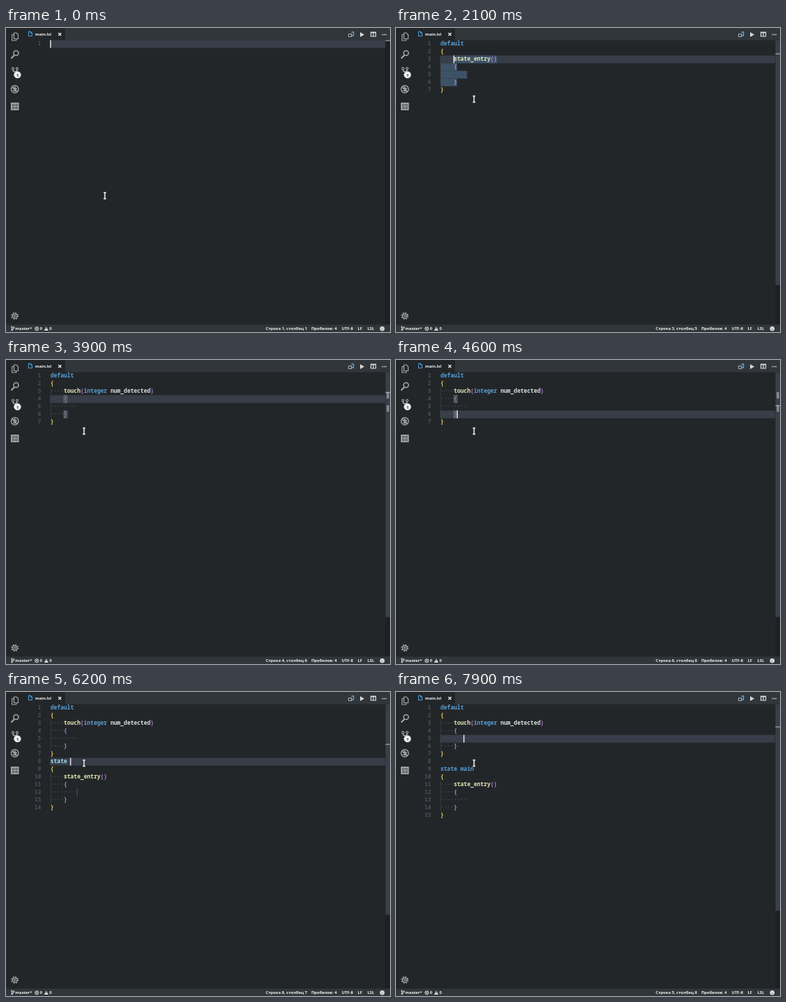
Write an HTML page that moves like this. It is 553 px wide and 436 px high and loops after 8000 ms.

```html
<!DOCTYPE html>
<html lang="ru">
<head>
<meta charset="utf-8">
<title>main.lsl</title>
<style>
html, body { margin: 0; width: 100%; height: 100%; overflow: hidden; background: #232629; }
svg { display: block; width: 553px; height: 436px; }
text { white-space: pre; }
.code text { font: 600 8px "Noto Sans Mono", "DejaVu Sans Mono", monospace; }
.ui { font: 600 5.9px "Noto Sans", "Open Sans", sans-serif; fill: #f3f4f5; }
.icon { fill: none; stroke: #a3a7aa; stroke-width: 1.2; }
</style>
</head>
<body>
<svg viewBox="0 0 553 436" xmlns="http://www.w3.org/2000/svg">
  <rect width="553" height="436" fill="#232629"/>
  <rect x="85" width="468" height="17.500" fill="#31363b"/>
  <g class="code" id="editor"></g>
  <g class="icon">
    <path d="M11.500 7h3.500l2.500 2.500v6h-6zM11 9.500h-2.300v8.500h6v-2"/>
    <circle cx="14.500" cy="36" r="3.500" stroke-width="1.600"/>
    <path d="M12 39l-4.500 4.500" stroke-width="2.200"/>
    <circle cx="10" cy="58" r="1.500"/><circle cx="16" cy="58" r="1.500"/><circle cx="13" cy="67" r="1.500"/>
    <path d="M10 59.500q0 3 3 3.500q3-.5 3-3.500M13 63v3" stroke-width="1.500"/>
    <circle cx="12.700" cy="87.800" r="5.300" stroke-width="1.400"/>
    <path d="M9 84l7.500 7.500M9.500 87h6.500M10 90h5.500M12.800 84v7.500" stroke-width="1.600"/>
    <rect x="7.500" y="107.500" width="10.500" height="10" fill="#a3a7aa" stroke="#a3a7aa" stroke-width="1"/>
    <path d="M9.300 109.300h2.500v2.300h-2.500zM13.800 109.300h2.500v2.300h-2.500zM9.300 113.600h2.500v2.300h-2.500zM13.800 113.600h2.500v2.300h-2.500z" stroke="#3a3e42" stroke-width=".8"/>
    <circle cx="12.700" cy="413" r="3.100"/>
    <circle cx="12.700" cy="413" r="4.500" stroke-dasharray="1.770" stroke-width="1.700"/>
    <circle cx="12.700" cy="413" r=".8"/>
  </g>
  <circle cx="16.600" cy="67.300" r="5" fill="#eceeef"/>
  <text x="16.600" y="69.500" text-anchor="middle" class="ui" style="fill:#31363b">1</text>
  <path d="M32.500 5h3l2 2v4.500h-5zM35.300 5v2.200h2" fill="none" stroke="#4aa3df"/>
  <text x="42" y="11.200" class="ui">main.lsl</text>
  <path d="M75.500 7l4 4m0-4l-4 4" stroke="#eee" stroke-width="1.300"/>
  <g class="icon" stroke-width="1">
    <path d="M497 6h3.500v5h-3M493.500 8.500h4v4h-4z"/>
    <path d="M496 8l3 3M499 5l2 2" stroke="#4aa3df" stroke-width="1.500"/>
    <path d="M525.500 6h7v6h-7zM529 6v6M525.500 6.700h7" stroke="#dfe1e3"/>
  </g>
  <path d="M510 6l6 3.500l-6 3.500z" fill="#d5d8da"/>
  <path d="M541.500 9.500h1.500m1 0h1.500m1 0h1.500" stroke="#d5d8da" stroke-width="1.500"/>
  <rect y="425.500" width="553" height="10.500" fill="#31363b"/>
  <g fill="none" stroke="#eceef0">
    <circle cx="8.500" cy="428.800" r=".8"/><circle cx="8.500" cy="433.200" r=".8"/><circle cx="11.300" cy="429.500" r=".8"/>
    <path d="M8.500 429.500v3q2.500 0 2.800-2.200"/>
    <circle cx="44.300" cy="431.300" r="2.500"/><path d="M43.200 430.200l2.200 2.200m0-2.200l-2.200 2.200"/>
  </g>
  <path d="M58 428.400l3 5.500h-6z" fill="#eceef0"/>
  <path d="M58 430.200v1.700m0 .6v.8" stroke="#31363b" stroke-width=".8"/>
  <circle cx="541.800" cy="431.200" r="3.300" fill="#eceef0"/>
  <path d="M540 431.500q1.800 2.400 3.600 0M540.600 429.400v1m2.400-1v1" fill="none" stroke="#31363b" stroke-width=".7"/>
  <g class="ui">
    <text x="13.300" y="433.400">master*</text><text x="48.800" y="433.400">0</text><text x="62.500" y="433.400">0</text>
    <text id="position" x="433.600" y="433.400" text-anchor="end"></text>
    <text x="476.300" y="433.400" text-anchor="end">Пробелов: 4</text><text x="483.500" y="433.400">UTF-8</text>
    <text x="506.500" y="433.400">LF</text><text x="520.500" y="433.400">LSL</text>
  </g>
  <g class="code" id="popup"></g>
  <g id="mouse">
    <path id="beam" d="M-2-4.500h4M-2 4.500h4M0-4.500v9" stroke="#202225" stroke-width="2.800"/>
    <path id="beamCore" d="M-1.800-4.300h3.600M-1.800 4.300h3.600M0-4.300v8.600" stroke="#e6e7e8" stroke-width="1.700"/>
    <path id="hand" d="M-1.500 1v-4q.8-1.500 1.600 0v3l3.500.6q1 .5.800 2l-.8 4.400h-4.400l-2.700-4q.5-1.500 2-.5z" fill="#222" stroke="#eee" stroke-width=".7"/>
  </g>
</svg>
<script>
const LOOP = 8000, LEFT = 64, TOP = 17.5, CHAR = 4.8, LINE = 11, VIEW = 408;
const COLORS = { keyword: '#569fd6', open: '#9bdcf0', call: '#e3e3b4', plain: '#d9dde1', outer: '#f5cf5c', inner: '#c07be6', dots: '#4b5159' };
const byId = id => document.getElementById(id);
const rect = (x, y, w, h, fill, extra = '') => `<rect x="${x}" y="${y}" width="${w}" height="${h}" fill="${fill}" ${extra}/>`;
const text = (x, y, body, fill = COLORS.plain, extra = '') => `<text x="${x}" y="${y}" fill="${fill}" ${extra}>${body}</text>`;
const span = (body, fill) => `<tspan fill="${fill}">${body}</tspan>`;
const lineTop = line => TOP + (line - 1) * LINE;
const columnX = column => LEFT + (column - 1) * CHAR;

const block = (head, handler) => [head, '{', '    ' + handler, '    {', '        ', '    }', '}'];
const ENTRY = block('default', 'state_entry()');
const TOUCH = block('default', 'touch(integer num_detected)');
const withState = name => [...TOUCH, ...block('state ' + name, 'state_entry()')];
const spaced = [...TOUCH, '', ...block('state main', 'state_entry()')];
const bare = body => ['default', '{', '    ' + body, '}'];

const body = head => [head, '{', '', '}'];
const lists = {
  d: { at: [1, 2], kind: 'snippet (LSL)', info: body('default'),
    items: 'default dataserver do DATA_BORN DATA_NAME DATA_ONLINE DATA_PAYINFO DATA_RATING DATA_SIM_POS DATA_SIM_RATING DATA_SIM_STATUS DEBUG_CHANNEL' },
  t: { at: [3, 6], kind: 'event (LSL)', info: body('timer()'), scroll: true,
    items: 'timer touch touch_end touch_start transaction_result TEXTURE_BLANK TEXTURE_DEFAULT TEXTURE_MEDIA TEXTURE_PLYWOOD TEXTURE_TRANSPARENT TOUCH_INVALID_FACE TOUCH_INVALID_TEXCOORD' },
  s: { at: [8, 2], kind: 'event (LSL)', info: body('sensor(integer num_detected)'),
    items: 'sensor ' + 'agent/about agent/completename agent/displayname agent/im agent/inspect agent/username group/about group/inspect parcel/about teleport/x/y/z worldmap/x/y/z'
      .split(' ').map(path => 'slurl:app/' + path).join(' ') },
  st: { at: [8, 2], kind: 'snippet (LSL)', info: body('state'),
    items: 'state state_entry state_exit string STATUS_BLOCK_GRAB STATUS_DIE_AT_EDGE STATUS_PHANTOM STATUS_PHYSICS STATUS_RETURN_AT_EDGE STATUS_ROTATE_X STATUS_ROTATE_Y STATUS_ROTATE_Z' }
};
const suggest = (key, typed = key, row = 0, details = true) => ({ ...lists[key], typed, row, details });

// time, lines, caret line, caret column, extras
const steps = [
  [0, [''], 1, 1],
  [200, ['d'], 1, 2, { popup: suggest('d') }],
  [400, ['de'], 1, 3, { popup: { ...suggest('d', 'de'), items: 'default DEBUG_CHANNEL' } }],
  [600, ['def'], 1, 4, { popup: { ...suggest('d', 'def'), items: 'default' } }],
  [900, ENTRY, 5, 9],
  [1400, ENTRY, 6, 6, { pair: [4, 6, 5] }],
  [1600, ENTRY, 5, 9, { select: true }],
  [1800, ENTRY, 4, 6, { select: true }],
  [2000, ENTRY, 3, 5, { select: true }],
  [2200, bare(''), 3, 5],
  [2600, bare('t'), 3, 6, { popup: suggest('t', 't', 0, false) }],
  [2900, bare('t'), 3, 6, { popup: suggest('t') }],
  [3000, bare('t'), 3, 6, { popup: { ...suggest('t', 't', 1), info: body('touch(integer num_detected)') } }],
  [3200, TOUCH, 5, 9],
  [3400, TOUCH, 4, 6, { pair: [4, 6, 5] }],
  [4000, TOUCH, 3, 9],
  [4200, TOUCH, 4, 6, { pair: [4, 6, 5] }],
  [4300, TOUCH, 5, 9],
  [4400, TOUCH, 6, 6, { pair: [4, 6, 5] }],
  [4700, TOUCH, 7, 2, { pair: [2, 7, 1] }],
  [4900, [...TOUCH, ''], 8, 1],
  [5200, [...TOUCH, 's'], 8, 2, { popup: suggest('s') }],
  [5400, [...TOUCH, 'st'], 8, 3, { popup: suggest('st') }],
  [5600, [...TOUCH, 'sta'], 8, 4, { popup: suggest('st', 'sta') }],
  [5800, withState(''), 8, 7, { stop: true }],
  ...['m', 'ma', 'mai', 'main'].map((name, i) => [6500 + i * 100, withState(name), 8, 8 + i, { stop: true }]),
  [7100, withState('main'), 7, 2, { pair: [2, 7, 1] }],
  [7400, spaced, 8, 1],
  [7500, spaced, 7, 1, { pair: [2, 7, 1] }],
  [7600, spaced, 6, 1],
  [7700, spaced, 5, 1],
  [7800, spaced, 5, 9],
  [7900, spaced, 5, 8]
];

function colorize(source, bracket) {
  // An unfinished word or a state without a name is not yet a keyword.
  if (/^(s|st|sta|state )$/.test(source)) return span(source, COLORS.open);
  return source.replace(/\w+|[(){}]/g, (token, at) => {
    if (/[(){}]/.test(token)) return span(token, bracket);
    if (/^(default|state|integer|main|mai|ma|m)$/.test(token)) return span(token, COLORS.keyword);
    return source[at + token.length] === '(' ? span(token, COLORS.call) : token;
  });
}

function drawCodeLine(source, line) {
  const indent = source.match(/^ */)[0].length, y = lineTop(line) + 7.9;
  const guide = indent ? rect(LEFT, lineTop(line), .6, LINE, '#41474f') : '';
  return guide + text(LEFT, y, '·'.repeat(indent), COLORS.dots)
    + text(columnX(indent + 1), y, colorize(source.slice(indent), indent ? COLORS.inner : COLORS.outer));
}

function drawEditor(lines, line, column, { pair, select, stop }, caretOn) {
  const scale = VIEW / (VIEW + (lines.length - 1) * LINE);
  const rulerY = n => TOP + (n - 1) * LINE * scale;
  let out = rect(LEFT - .5, lineTop(line), 483, LINE, '#383e49') + rect(546.5, TOP, 6.5, VIEW, '#1e2124');
  if (lines.length > 1) out += rect(546.5, TOP, 6.5, VIEW * scale, '#383f49');
  if (select) for (let n = line; n <= 6; n++) {
    const from = n === line ? column : 1;
    out += rect(columnX(from), lineTop(n), (lines[n - 1].length + 1 - from) * CHAR, LINE, '#3d5266');
  }
  if (pair) for (const n of pair.slice(0, 2)) {
    out += rect(columnX(pair[2]) + .2, lineTop(n) + .5, CHAR - .2, LINE - 1, '#30383d', 'stroke="#858a90" stroke-width=".7"');
    out += rect(548.2, rulerY(n), 3.4, LINE * scale, '#858b93');
  }
  out += rect(546.5, rulerY(line), 6.5, 1.2, '#a5abb2');
  if (stop) out += rect(columnX(9) - .3, lineTop(12), .8, LINE, '#62676c');
  lines.forEach((source, i) => {
    out += text(50.6, lineTop(i + 1) + 7.9, i + 1, '#495059', 'text-anchor="end"') + drawCodeLine(source, i + 1);
  });
  if (caretOn) out += rect(columnX(column) - .5, lineTop(line), 1.4, LINE, '#f1f3f5');
  return out;
}

function drawPopup({ at, kind, info, items, typed, row, details, scroll }) {
  const x = columnX(at[1]) + .4, y = lineTop(at[0] + 1) + .3, names = items.split(' ');
  let out = rect(x, y, 163, names.length * LINE - .8, '#31363d') + rect(x, y + row * LINE, 163, LINE, '#262a2f');
  names.forEach((name, i) => {
    const top = y + i * LINE;
    out += rect(x + 3.2, top + 2.8, 5.4, 5.4, 'none', 'stroke="#c3c7cb" stroke-width="1"')
      + rect(x + 3.6, top + 2.8, 1.2, 5.4, '#c3c7cb')
      + text(x + 11.6, top + 8, `<tspan font-weight="800" fill="#fff">${name.slice(0, typed.length)}</tspan>${name.slice(typed.length)}`, '#d6d9dc');
  });
  if (scroll) out += rect(x + 158, y, 5, 68, '#4b525d');
  if (!details) return out;
  const left = x + 164;
  out += rect(left, y + .5, 164, 61.5, '#31363d') + text(left + 3, y + 10.5, kind, '#a2a8ae')
    + `<path d="M${left + 155} ${y + 4.5}l3.600 3.600m0-3.600l-3.600 3.600" stroke="#c7cbcf" stroke-width=".9"/>`;
  info.forEach((source, i) => { out += text(left + 3, y + 25.2 + i * LINE, colorize(source, COLORS.plain)); });
  return out;
}

function drawMouse(time, popup) {
  const p = Math.min(1, Math.max(0, (time - 100) / 800)), ease = p * p * (3 - 2 * p);
  const x = 142.4 - 30 * ease, y = 240.5 - 138.5 * ease;
  let over = false;
  if (popup) {
    const left = columnX(popup.at[1]), top = lineTop(popup.at[0] + 1);
    over = x > left && x < left + 163 && y > top && y < top + popup.items.split(' ').length * LINE;
  }
  byId('mouse').setAttribute('transform', `translate(${x} ${y + (over ? 3 : 0)})`);
  byId('hand').style.display = over ? '' : 'none';
  byId('beam').style.display = byId('beamCore').style.display = over ? 'none' : '';
}

let shown = '';
function render(now) {
  const time = Math.floor(now % LOOP / 100) * 100;
  const index = steps.findLastIndex(step => step[0] <= time);
  const [start, lines, line, column, extras = {}] = steps[index];
  const caretOn = (time - start) % 1000 < 500;
  if (shown !== index + '/' + caretOn) {
    shown = index + '/' + caretOn;
    byId('editor').innerHTML = drawEditor(lines, line, column, extras, caretOn);
    byId('popup').innerHTML = extras.popup ? drawPopup(extras.popup) : '';
    byId('position').textContent = `Строка ${line}, столбец ${column}`;
  }
  drawMouse(time, extras.popup);
}

const begin = performance.now();
function tick() {
  render(performance.now() - begin);
  requestAnimationFrame(tick);
}
tick();
</script>
</body>
</html>
```
